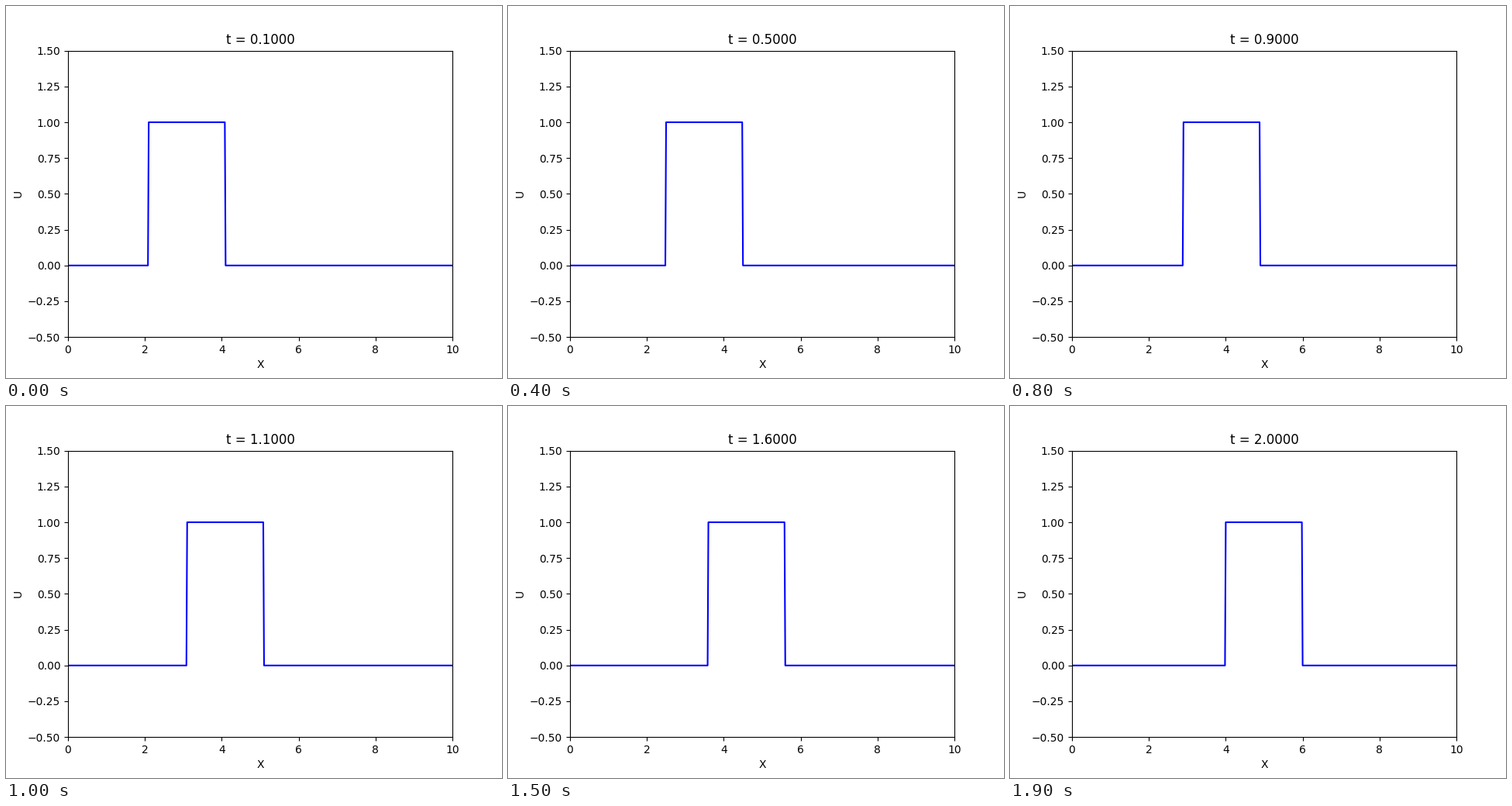
These frames come from a looping animation (640x480 px, 2 s). A matplotlib script:

```python
import numpy as np
import matplotlib.pyplot as plt
from matplotlib.animation import FuncAnimation

DX = 0.02
DT = 0.1
FRAMES = 20
SHIFT = round(DT / DX)  # grid cells travelled per frame

x = np.linspace(0, 10, round(10 / DX) + 1)
start = np.zeros_like(x)
start[round(2 / DX):round(4 / DX)] = 1.0

fig, ax = plt.subplots(figsize=(6.4, 4.8), dpi=100)
ax.set(xlim=(0, 10), ylim=(-0.5, 1.5), xlabel="X", ylabel="U")
title = ax.set_title("")
line, = ax.plot(x, start, color="blue", lw=1.5)


def update(i):
    """Carry the square pulse to the right at unit speed."""
    step = i + 1
    line.set_ydata(np.roll(start, step * SHIFT))
    title.set_text(f"t = {step * DT:.4f}")
    return line, title


anim = FuncAnimation(fig, update, frames=FRAMES, init_func=lambda: update(0),
                     interval=100, repeat=True, repeat_delay=0, blit=False)
plt.show()
```
